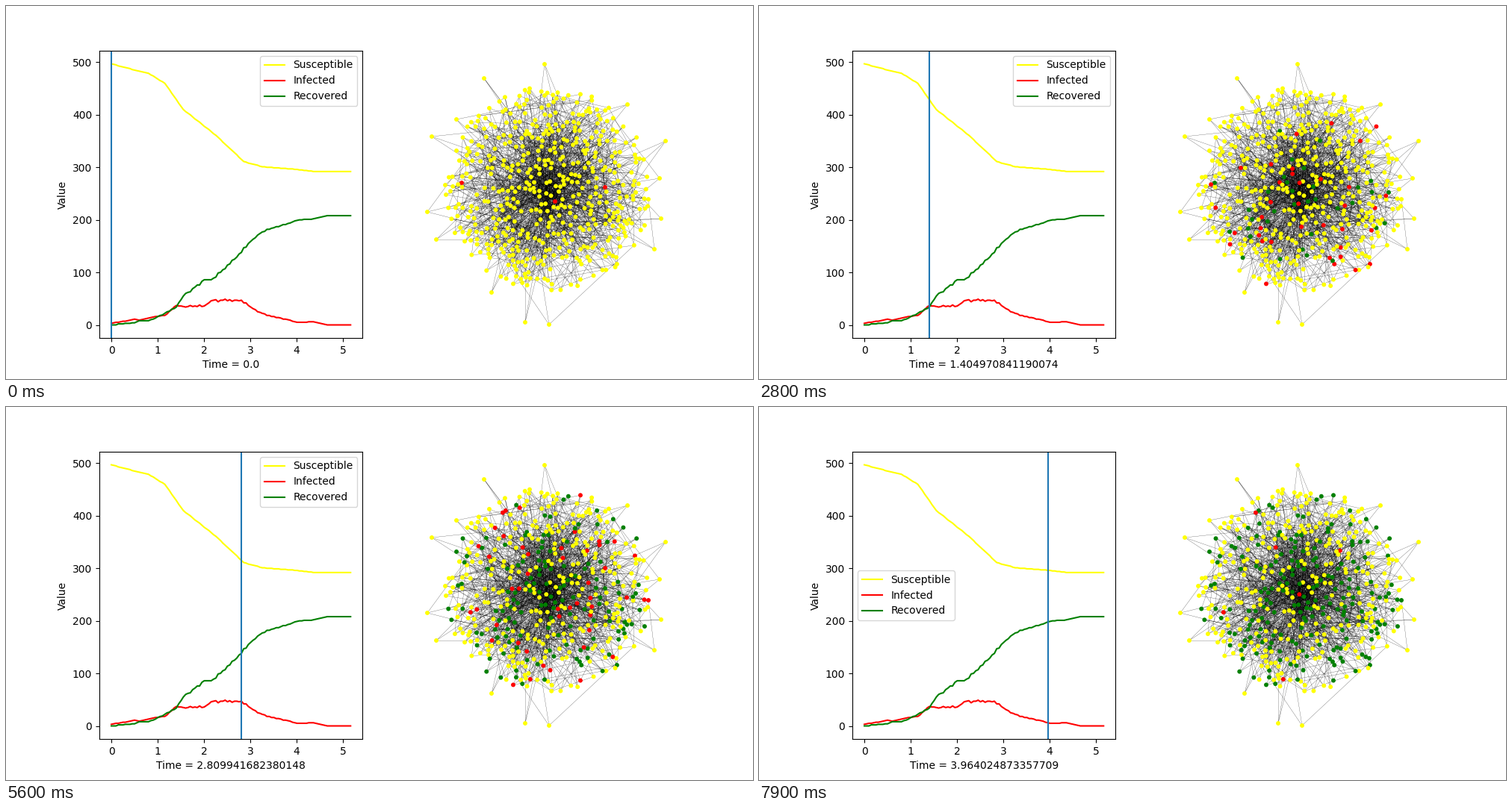
A matplotlib script that plays this animation: 1000 by 500 pixels, repeating every 8 s.

```python
import numpy as np
import matplotlib.pyplot as plt
from matplotlib.animation import FuncAnimation
from matplotlib.collections import LineCollection

FRAMES = 80
STEPS = 104
DT = 0.5519528304675291 / 11
PEOPLE = 500
LINKS = 3
NEVER = 999
CENTRE = np.array([726, 246])
COLOURS = np.array([(1, 1, 0), (1, 0, 0), (0, 128 / 255, 0)])
rng = np.random.default_rng(7)

# Key places in pixels: first cases, rim that stays healthy, rest of the rim
FIRST = [(610, 237), (802, 243), (735, 262)]
HEALTHY = [(721, 78), (640, 97), (832, 132), (883, 181), (875, 231),
           (877, 285), (868, 326), (695, 424), (650, 384)]
EXPOSED = [(564, 276), (570, 175), (576, 313), (588, 240), (603, 152), (727, 427)]


def series(*knots):
    """Counts per step, interpolated between a few (step, count) knots."""
    return np.interp(np.arange(STEPS), *zip(*knots))


def epidemic():
    sus = np.rint(series((0, 497), (11, 484), (16, 479), (23, 460), (31, 410),
                         (45, 361), (57, 311), (65, 301), (80, 296),
                         (87, 292), (103, 292)))
    sick = series((0, 3), (10, 11), (12, 9), (23, 19), (28, 36), (40, 37),
                  (43, 46), (55, 48), (62, 28), (67, 19), (80, 5), (87, 6),
                  (93, 0), (103, 0))
    sick = np.rint(sick + sick / 45 * rng.uniform(-2.5, 2.5, STEPS))
    well = np.maximum.accumulate(PEOPLE - sus - sick)
    return sus, PEOPLE - sus - well, well


def place_people():
    """Key places, then a loose random cloud around the centre."""
    places = [np.array(p, float) for p in FIRST + HEALTHY + EXPOSED]
    while len(places) < PEOPLE:
        angle = rng.uniform(0, 2 * np.pi)
        radius = 138 * rng.random() ** 0.58
        spot = CENTRE + radius * np.array([np.cos(angle), np.sin(angle)])
        if np.hypot(*(np.array(places) - spot).T).min() > 4.6:
            places.append(spot)
    return np.array(places)


def link_people(places):
    """Preferential attachment that grows from the centre outwards."""
    radius = np.hypot(*(places - CENTRE).T)
    order = np.argsort(radius + rng.normal(0, 12, PEOPLE))
    degree = np.full(PEOPLE, LINKS)
    pairs = []
    for i in range(LINKS, PEOPLE):
        node, older = order[i], order[:i]
        gaps = np.hypot(*(places[older] - places[node]).T)
        weight = degree[older] * np.exp(-gaps / 80)
        picks = rng.choice(older, LINKS, replace=False, p=weight / weight.sum())
        degree[picks] += 1
        pairs += [(node, p) for p in picks]
    return np.array(pairs)


def spread(pairs, sus, well):
    """Steps at which each person falls ill and recovers."""
    near = np.zeros((PEOPLE, PEOPLE), bool)
    near[pairs[:, 0], pairs[:, 1]] = near[pairs[:, 1], pairs[:, 0]] = True
    ill, cured = np.full((2, PEOPLE), NEVER)
    ill[:len(FIRST)] = 0
    open_to = np.ones(PEOPLE, bool)
    open_to[len(FIRST):len(FIRST) + len(HEALTHY)] = False
    for k in range(1, FRAMES):
        while (ill <= k).sum() < PEOPLE - sus[k]:
            active = (ill <= k) & (cured > k)
            fresh = open_to & (ill > k)
            exposed = fresh & near[active].any(axis=0)
            ill[rng.choice(np.flatnonzero(exposed if exposed.any() else fresh))] = k
        while (cured <= k).sum() < well[k]:
            cured[rng.choice(np.flatnonzero((ill <= k) & (cured > k)))] = k
    return ill, cured


counts = epidemic()
people = place_people()
pairs = link_people(people)
ill, cured = spread(pairs, counts[0], counts[2])

fig = plt.figure(figsize=(10, 5), dpi=100)
chart = fig.add_subplot(1, 2, 1)
names = ("Susceptible", "Infected", "Recovered")
for values, colour, name in zip(counts, ("yellow", "red", "green"), names):
    chart.plot(np.arange(STEPS) * DT, values, color=colour, label=name)
cursor = chart.axvline(0)
chart.set_ylabel("Value")
chart.legend(loc="best")

net = fig.add_axes([0, 0, 1, 1])
net.set(xlim=(0, 1000), ylim=(500, 0))
net.axis("off")
net.add_collection(LineCollection(people[pairs], colors="black",
                                  linewidths=0.16, zorder=1))
dots = net.scatter(*people.T, s=18, linewidths=0, zorder=2)


def update(k):
    cursor.set_xdata([k * DT, k * DT])
    chart.set_xlabel(f"Time = {k * DT}")
    dots.set_facecolor(COLOURS[(ill <= k).astype(int) + (cured <= k)])
    return cursor, dots


anim = FuncAnimation(fig, update, frames=FRAMES, init_func=lambda: update(0),
                     interval=100, repeat=True, repeat_delay=0)
plt.show()
```
